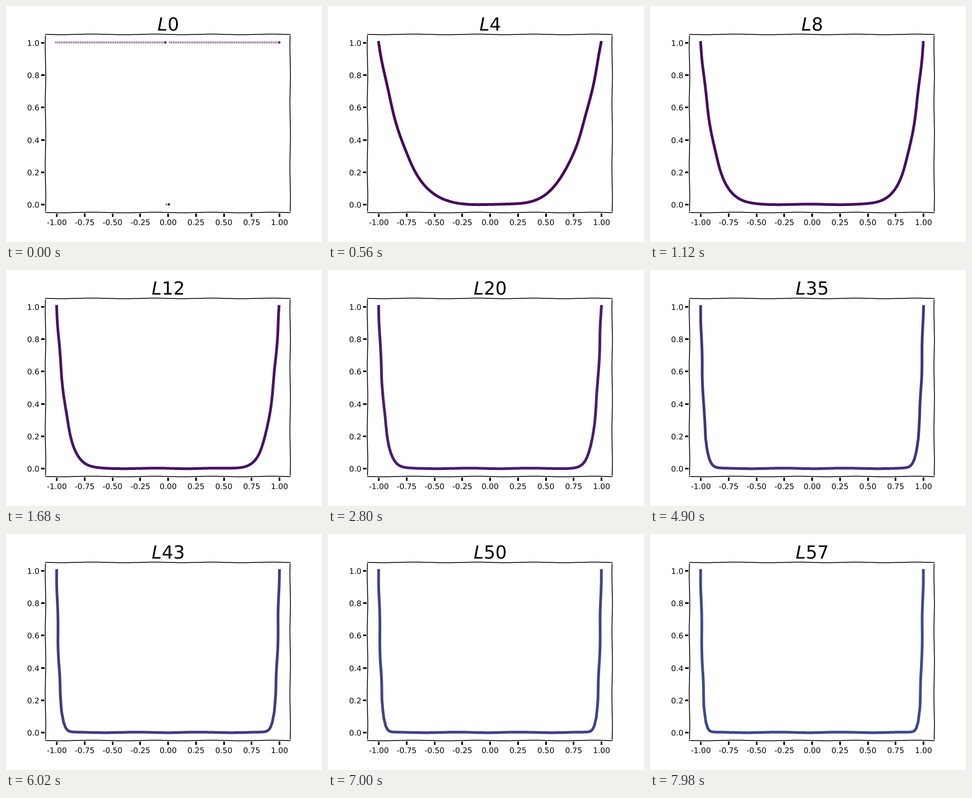
These frames come from a looping animation (576 by 432 pixels, 8 s). An HTML page:

```html
<!DOCTYPE html>
<html lang="en">
<head>
<meta charset="utf-8">
<title>Power curves</title>
<style>
  html, body { margin: 0; width: 100%; height: 100%; overflow: hidden; background: #fff; }
  svg { display: block; width: 576px; height: 432px; }
  text { font-family: "DejaVu Sans", Verdana, sans-serif; font-size: 14px; text-rendering: geometricPrecision; }
  #title { font-size: 33px; }
  #title .name { font-style: italic; }
  path { fill: none; }
</style>
</head>
<body>
<svg viewBox="0 0 576 432">
  <rect width="576" height="432" fill="#fff"/>
  <g id="plot"></g>
  <g id="axes"></g>
  <text id="title" x="295.7" y="45.4" text-anchor="middle"><tspan class="name">L</tspan><tspan id="power">0</tspan></text>
</svg>
<script>
const STEP = 140, LOOP = 8000, SAMPLES = 128;
const WOBBLE = { size: 0.5, length: 122 };
const BOX = { left: 72, right: 518, top: 52, bottom: 378 };
const px = x => 295.2 + 202.91 * x;
const py = y => 363.17 - 296.5 * y;
const snap = v => Math.round(v) + 0.5;

// Colour stops: [power, red, green, blue]
const STOPS = [
  [0, 68, 1, 84], [4, 70, 7, 90], [12, 71, 19, 101], [20, 72, 29, 111], [27, 72, 38, 119],
  [35, 70, 48, 126], [43, 68, 58, 131], [51, 65, 68, 135], [57, 62, 74, 137]
];

const plot = document.getElementById("plot");
const axes = document.getElementById("axes");
const power = document.getElementById("power");

function add(parent, tag, attrs, text) {
  const el = document.createElementNS("http://www.w3.org/2000/svg", tag);
  for (const key in attrs) el.setAttribute(key, attrs[key]);
  if (text !== undefined) el.textContent = text;
  parent.appendChild(el);
  return el;
}

function colour(n) {
  const i = Math.max(1, STOPS.findIndex(s => s[0] >= n));
  const a = STOPS[i - 1], b = STOPS[i];
  const k = (n - a[0]) / (b[0] - a[0]);
  return `rgb(${[1, 2, 3].map(c => Math.round(a[c] + (b[c] - a[c]) * k))})`;
}

// Hand-drawn wobble: walk the line in 1px steps and push each point
// sideways along a sine whose phase advances at a random rate.
function sketch(points) {
  let seed = 0, phase = 0;
  let [lastX, lastY] = points[0];
  let d = `M${lastX} ${lastY}`;

  function put(x, y) {
    seed = (Math.imul(214013, seed) + 2531011) >>> 0;
    phase += 2 ** (2 * seed / 2 ** 32 - 1);
    const r = Math.sin(phase * 2 * Math.PI / WOBBLE.length) * WOBBLE.size;
    const dx = lastX - x, dy = lastY - y, len = Math.hypot(dx, dy) || 1;
    lastX = x;
    lastY = y;
    d += `L${(x + r * dy / len).toFixed(2)} ${(y - r * dx / len).toFixed(2)}`;
  }

  for (let i = 1; i < points.length; i++) {
    const [x0, y0] = points[i - 1], [x1, y1] = points[i];
    const dx = x1 - x0, dy = y1 - y0;
    const step = 1 / Math.hypot(dx, dy);
    for (let k = step; k < 1 - step; k += step) put(x0 + dx * k, y0 + dy * k);
    put(x1, y1);
  }
  return d;
}

function drawAxes() {
  for (let i = 0; i <= 8; i++) {
    const v = i / 4 - 1, x = px(v);
    add(axes, "path", { d: `M${snap(x)} ${BOX.bottom}v8`, stroke: "#000", "stroke-width": 3 });
    add(axes, "text", { x: x + 0.4, y: 401, "text-anchor": "middle" }, v.toFixed(2));
  }
  for (let i = 0; i <= 5; i++) {
    const v = i / 5, y = py(v);
    add(axes, "path", { d: `M${BOX.left} ${snap(y)}h-8`, stroke: "#000", "stroke-width": 3 });
    add(axes, "text", { x: 60.8, y: Math.round(y) + 6, "text-anchor": "end" }, v.toFixed(1));
  }
  const { left, right, top, bottom } = BOX;
  const spines = [
    [[left, bottom], [left, top]],
    [[right, bottom], [right, top]],
    [[left, bottom], [right, bottom]],
    [[left, top], [right, top]]
  ];
  for (const ends of spines) {
    const d = sketch(ends);
    add(axes, "path", { d, stroke: "#fff", "stroke-width": 4, "stroke-linecap": "square" });
    add(axes, "path", { d, stroke: "#000", "stroke-width": 1.5, "stroke-linecap": "square" });
  }
}

const xs = Array.from({ length: SAMPLES }, (_, i) => 2 * i / (SAMPLES - 1) - 1);

function drawDots() {
  for (const x of xs) {
    const y = Math.abs(x) < 0.01 ? 0 : 1;
    const at = { cx: px(x), cy: py(y) };
    add(plot, "circle", { ...at, r: 4.1, fill: "#fff" });
    add(plot, "circle", { ...at, r: 2.2, fill: colour(0) });
  }
}

function drawCurve(n) {
  add(plot, "path", {
    d: sketch(xs.map(x => [px(x), py(Math.abs(x) ** n)])),
    stroke: colour(n), "stroke-width": 5, "stroke-linecap": "square", "stroke-linejoin": "round"
  });
}

let shown = -1;
function show(n) {
  if (n === shown) return;
  shown = n;
  plot.replaceChildren();
  power.textContent = n;
  if (n === 0) drawDots();
  else drawCurve(n);
}

const start = performance.now();
function tick() {
  show(Math.floor((performance.now() - start) % LOOP / STEP));
  requestAnimationFrame(tick);
}

drawAxes();
tick();
</script>
</body>
</html>
```
